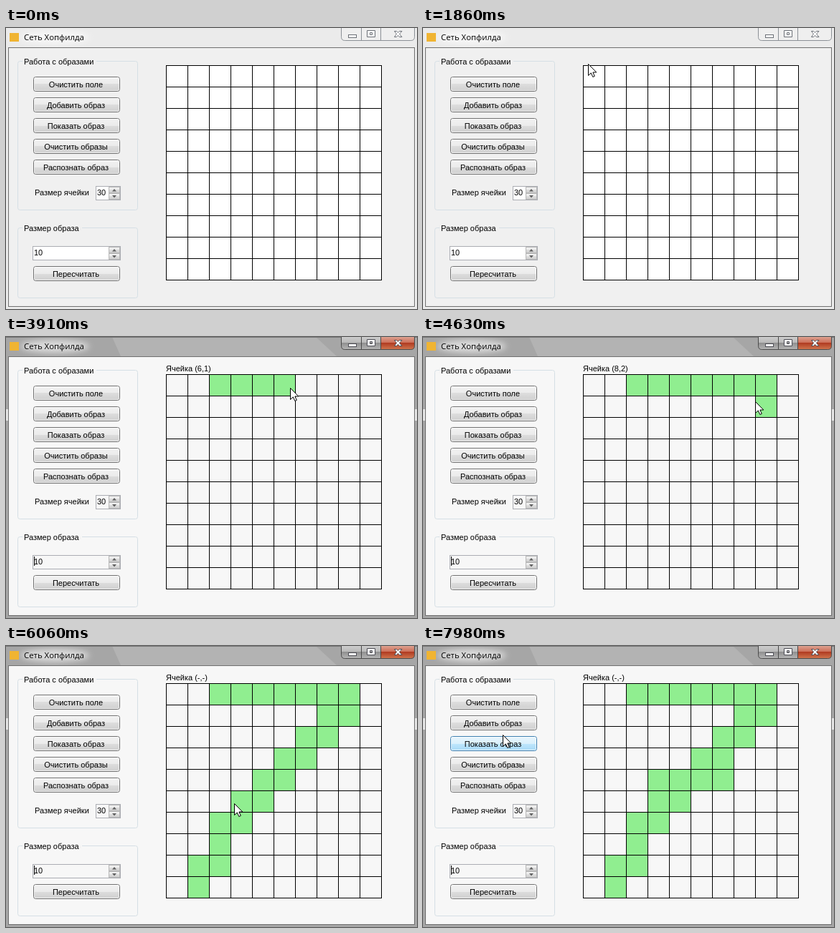
An HTML page that plays this animation: 573x393 px, repeating every 8000 ms.

```html
<!DOCTYPE html>
<html lang="ru">
<head>
<meta charset="utf-8">
<title>Сеть Хопфилда</title>
<style>
html, body { margin: 0; width: 100%; height: 100%; overflow: hidden; background: #ebebeb; }
svg { display: block; width: 573px; height: 393px; --face: #f0f0f0; --paper: #fff; }
text { font: 11px "Liberation Sans", Arial, sans-serif; fill: #000; }
.title { font: 11.4px "Open Sans", "Noto Sans", sans-serif; }
.face { fill: var(--face); }
.paper { fill: var(--paper); }
.active #surface { --face: #f7f7f7; --paper: #f7f7f7; }
#fresh { --face: #f0f0f0; --paper: #fff; }
.on, #fresh { display: none; }
.active .on, .active #fresh { display: inline; }
.active .off { display: none; }
.line { fill: none; stroke: #d5dfe5; }
.button rect { fill: url(#plain); stroke: #707070; }
.button .shine { fill: none; stroke: #fff; stroke-opacity: .7; }
.button.hover rect:first-child { fill: url(#hot); stroke: #3c7fb1; }
.button text { text-anchor: middle; }
.cell { fill: #90ee90; }
</style>
</head>
<body>
<svg id="stage" viewBox="0 0 573 393">
  <defs>
    <linearGradient id="plain" x2="0" y2="1">
      <stop stop-color="#f2f2f2"/><stop offset=".5" stop-color="#ebebeb"/>
      <stop offset=".5" stop-color="#dddddd"/><stop offset="1" stop-color="#cfcfcf"/>
    </linearGradient>
    <linearGradient id="hot" x2="0" y2="1">
      <stop stop-color="#eaf6fd"/><stop offset=".5" stop-color="#d9f0fc"/>
      <stop offset=".5" stop-color="#bee6fd"/><stop offset="1" stop-color="#a7d9f5"/>
    </linearGradient>
    <linearGradient id="glass" x2="0" y2="1">
      <stop stop-color="#cfcfcf"/><stop offset=".5" stop-color="#b8b8b8"/>
      <stop offset=".5" stop-color="#8f8f8f"/><stop offset="1" stop-color="#b5b5b5"/>
    </linearGradient>
    <linearGradient id="red" x2="0" y2="1">
      <stop stop-color="#dfa797"/><stop offset=".5" stop-color="#cc6c55"/>
      <stop offset=".5" stop-color="#b03a20"/><stop offset="1" stop-color="#d0764f"/>
    </linearGradient>
    <filter id="blur" x="-20%" y="-60%" width="140%" height="220%"><feGaussianBlur stdDeviation="4"/></filter>
    <clipPath id="freshArea"></clipPath>
    <g id="glyphs">
      <rect x="477.5" y="9.5" width="11" height="4"/>
      <path d="M503.5 3.5h11v9h-11zM507.5 6.5h3v3h-3z" fill-rule="evenodd"/>
      <path d="M541.5 4.5h3l2 2 2-2h3.5l-3.5 3.8 3.5 4.2h-3.5l-2-2.2-2 2.2h-3l3-4.2z"/>
    </g>
  </defs>

  <rect class="off" width="573" height="393" fill="#ebebeb"/>
  <g class="on">
    <rect width="573" height="393" fill="#a6a6a6"/>
    <path d="M148 0H432L461 27H160Z" fill="#b3b3b3"/>
    <path d="M0 101h3v16h-3zM570 101h3v16h-3z" fill="#e4e4e4"/>
    <path d="M0 .5H573" stroke="#777"/>
  </g>
  <ellipse cx="68" cy="13" rx="48" ry="9" fill="#fff" opacity=".6" filter="url(#blur)"/>
  <rect x="5" y="7" width="13" height="12" fill="#f0b432"/>
  <text class="title" x="25" y="17">Сеть Хопфилда</text>

  <g class="off" stroke="#8b9096">
    <path d="M467.5-1V12.500q0 5 5 5H564.500q5 0 5-5V-1M495.500 0V17M522.500 0V17" fill="#efefef"/>
    <use href="#glyphs" fill="#fff" stroke="#6b6f76"/>
  </g>
  <g class="on" stroke="#4a4a4a">
    <path d="M467.500-1V12.500q0 5 5 5H522.500V-1Z" fill="url(#glass)"/>
    <path d="M522.500-1V17.500H564.500q5 0 5-5V-1Z" fill="url(#red)"/>
    <path d="M495.500 0V17"/>
    <use href="#glyphs" fill="#fff" stroke="#4d4d55"/>
  </g>

  <g id="surface">
    <rect class="face" x="3" y="27" width="567" height="363"/>
    <rect class="paper" x="223" y="52" width="300" height="300"/>
    <rect class="paper" x="125" y="221" width="35" height="20"/>
    <rect class="paper" x="37" y="305" width="123" height="20"/>
  </g>
  <g clip-path="url(#freshArea)"><use id="fresh" href="#surface"/></g>
  <rect x="3.500" y="27.500" width="566" height="362" fill="none" stroke="#707070"/>
  <g id="controls"></g>
  <g id="cells"></g>
  <path id="grid" fill="none" stroke="#000"/>
  <text id="label" x="223" y="48"></text>
  <path id="caret" d="M39.500 307V320" stroke="#000"/>
  <path id="cursor" d="M.5.5V16.500L4.300 12.900 6.800 18.500 9.300 17.400 6.900 12H11.800Z" fill="#fff" stroke="#000"/>
</svg>
<script>
const LOOP = 8000, ACTIVATE = 3560, BLINK = 530;
const LEFT = 223, TOP = 52, CELL = 30, COUNT = 10;
const $ = id => document.getElementById(id);

// Pointer path: time, x, y
const path = [
  [1180, 562, 30], [1240, 535, 33], [1560, 350, 44], [1860, 230, 50], [1980, 224, 51],
  [2100, 214, 54], [2480, 214, 54], [2600, 235, 57], [2800, 315, 63], [3070, 428, 69],
  [3250, 437, 74], [3310, 425, 74], [ACTIVATE, 286, 71], [3910, 396, 71], [4080, 444, 72],
  [4320, 475, 77], [4570, 475, 77], [5110, 368, 194], [5350, 333, 232], [5440, 309, 258],
  [5650, 268, 338], [5780, 268, 338], [5900, 300, 305], [6060, 318, 220], [6170, 328, 192],
  [6230, 330, 190], [6930, 410, 187], [7040, 410, 187], [7500, 220, 185], [7810, 116, 168],
  [7980, 111, 124]
];
const drags = [[ACTIVATE, 5780], [6230, 7040]];

function pointerAt(t) {
  const next = path.findIndex(key => key[0] > t);
  if (next < 0) return path.at(-1).slice(1);
  if (next === 0) return path[0].slice(1);
  const [t0, x0, y0] = path[next - 1], [t1, x1, y1] = path[next];
  const k = (t - t0) / (t1 - t0);
  return [x0 + (x1 - x0) * k, y0 + (y1 - y0) * k];
}

const cellAt = ([x, y]) => [Math.floor((x - LEFT) / CELL) + 1, Math.floor((y - TOP) / CELL) + 1];

const rect = (x, y, w, h, more = '') => `<rect x="${x}" y="${y}" width="${w}" height="${h}" ${more}/>`;

const group = (y, bottom, gapEnd, title) =>
  `<path class="line" d="M23 ${y}.5H19.500q-3 0-3 3V${bottom - 3}.5q0 3 3 3H180.500q3 0 3-3V${y + 3}.5q0-3-3-3H${gapEnd}"/>
   <text x="25" y="${y + 5}">${title}</text>`;

const button = (y, title) =>
  `<g class="button" data-y="${y}">${rect(38.5, y + .5, 120, 20, 'rx="3"')}
   ${rect(39.5, y + 1.5, 118, 18, 'rx="2" class="shine"')}
   <text x="97.5" y="${y + 15}">${title}</text></g>`;

const spinner = (x, y, value) =>
  `${rect(x + .5, y + .5, 159 - x, 19, 'fill="none" stroke="#abadb3"')}
   <text x="${x + 2}" y="${y + 13}">${value}</text>` +
  [1, 10].map(dy => rect(143.5, y + dy + .5, 15, 8, 'fill="url(#plain)" stroke="#b8b8b8"')).join('') +
  `<path d="M148 ${y + 7}.500h6l-3-3.500zM148 ${y + 13}h6l-3 3.500z" fill="#606060"/>`;

$('controls').innerHTML =
  group(46, 254, 126, 'Работа с образами') +
  ['Очистить поле', 'Добавить образ', 'Показать образ', 'Очистить образы', 'Распознать образ']
    .map((title, i) => button(68 + 29 * i, title)).join('') +
  '<text x="40" y="234">Размер ячейки</text>' + spinner(125, 221, 30) +
  group(279, 377, 106, 'Размер образа') + spinner(37, 305, 10) + button(333, 'Пересчитать');
const buttons = [...document.querySelectorAll('.button')];

let lines = '';
for (let i = 0; i <= COUNT; i++) {
  const d = i * CELL + .5, size = COUNT * CELL + 1;
  lines += `M${LEFT + d} ${TOP}v${size}M${LEFT} ${TOP + d}h${size}`;
}
$('grid').setAttribute('d', lines);

// Every cell the pointer crosses while dragging is painted from that moment on.
const painted = new Map();
for (const [start, end] of drags)
  for (let t = start; t <= end; t += 4) {
    const key = cellAt(pointerAt(t)).join();
    if (!painted.has(key)) painted.set(key, t);
  }
$('cells').innerHTML = [...painted.keys()].map(key => {
  const [col, row] = key.split(',');
  return rect(LEFT + (col - 1) * CELL, TOP + (row - 1) * CELL, CELL, CELL, 'class="cell"');
}).join('');
const cells = [...painted.values()].map((time, i) => ({ time, node: $('cells').children[i] }));

// Areas that have regained their full tone since the window became active.
function freshArea(t, x) {
  if (t < ACTIVATE + BLINK) return rect(265, 39, Math.max(0, x + 12 - 265), 51);
  let area = rect(39, 39, 454, 281);
  if (t > 5600) area += rect(267, 320, 39, 37);
  if (t > 5880) area += rect(267, 320, 64, 9);
  return area;
}

const show = (node, visible) => node.style.display = visible ? '' : 'none';

function draw(t) {
  const [x, y] = pointerAt(t);
  const active = t >= ACTIVATE;
  const dragging = drags.some(([start, end]) => t >= start && t < end);
  $('stage').classList.toggle('active', active);
  $('freshArea').innerHTML = freshArea(t, x);
  for (const { time, node } of cells) show(node, t >= time);
  $('label').textContent = active ? `Ячейка (${dragging ? cellAt([x, y]).join() : '-,-'})` : '';
  show($('caret'), active && Math.floor((t - ACTIVATE) / BLINK) % 2 === 0);
  show($('cursor'), t >= path[0][0]);
  $('cursor').setAttribute('transform', `translate(${Math.round(x)} ${Math.round(y)})`);

  const [hoverX, hoverY] = pointerAt(t - 60);
  for (const node of buttons) {
    const dy = hoverY - node.dataset.y;
    node.classList.toggle('hover', hoverX < 159 && dy >= 0 && dy < 21);
  }
}

const begin = performance.now();
function tick() {
  draw((performance.now() - begin) % LOOP);
  requestAnimationFrame(tick);
}
tick();
</script>
</body>
</html>
```
